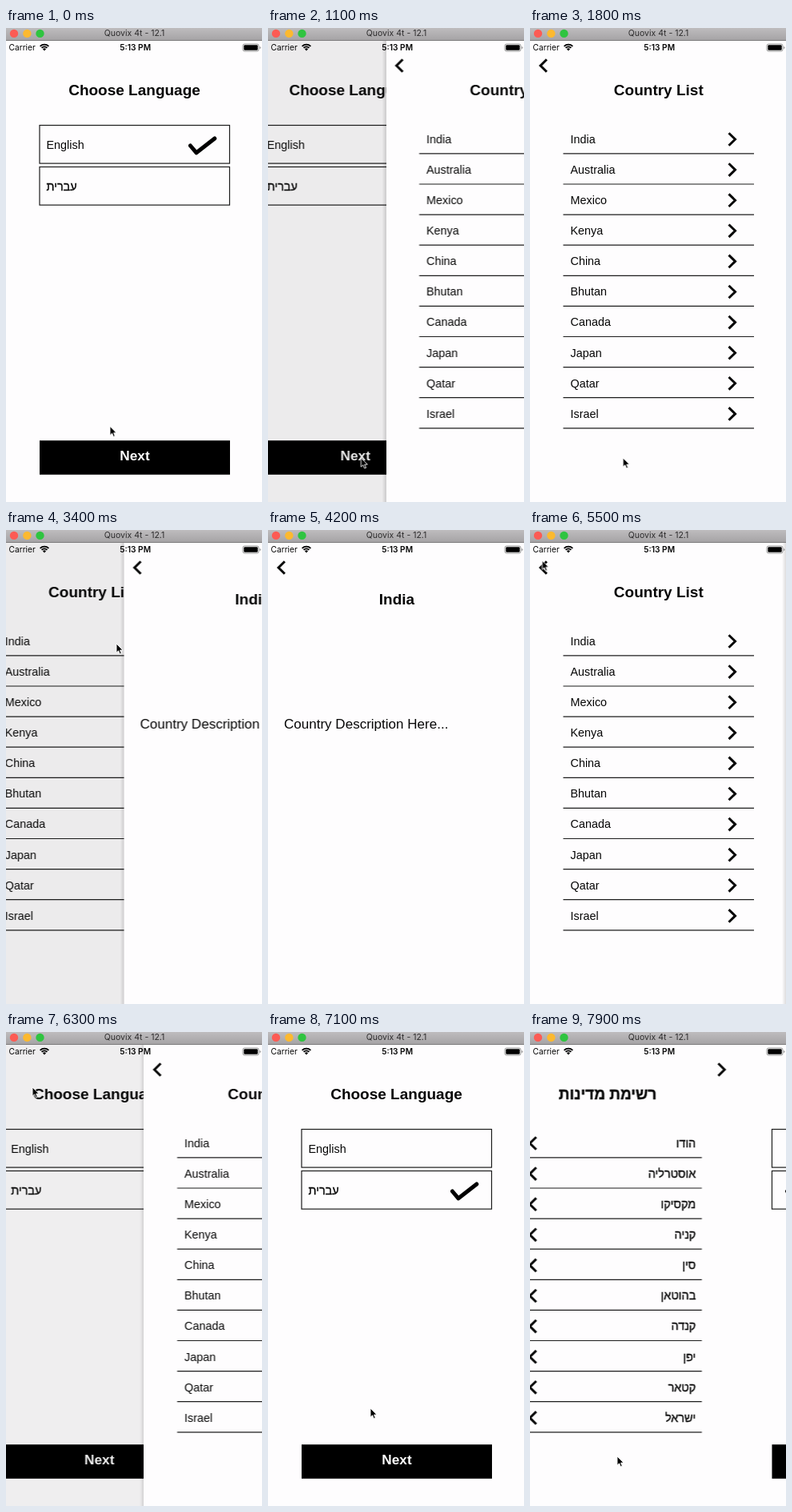
Animation, 320 px wide and 592 px high, one loop 8000 ms. Source, as an HTML page:

```html
<!DOCTYPE html>
<html lang="en">
<head>
<meta charset="utf-8">
<title>Language and country picker</title>
<style>
  html, body { margin: 0; width: 100%; height: 100%; overflow: hidden; background: #fefdfe; }
  svg { display: block; width: 320px; height: 592px; overflow: hidden; }
  text { font-family: "Liberation Sans", Arial, sans-serif; fill: #060606; }
  .title { font-size: 19px; font-weight: 700; text-anchor: middle; }
  .row { font-size: 14.4px; }
  .end { text-anchor: end; }
  .hebrew { stroke: #060606; stroke-width: .35; }
  .note { font-size: 17.05px; }
  .next { font-size: 17.2px; font-weight: 700; text-anchor: middle; fill: #fff; }
  .bar { font: 10.2px Inter, sans-serif; }
  .clock { font-weight: 600; text-anchor: middle; }
  .window { font: 10.5px Inter, sans-serif; text-anchor: middle; fill: #2c2b2c; }
  .line { fill: none; stroke: #1c1c1c; stroke-width: 1.2; }
  .chevron { fill: none; stroke: #080808; stroke-width: 3; }
  .check { fill: none; stroke: #000; stroke-width: 5; stroke-linecap: round; stroke-linejoin: round; }
</style>
</head>
<body>
<svg id="stage" viewBox="0 0 320 592"></svg>
<script>
const LOOP = 8000, TICK = 100, WIDTH = 320;
const countries = ['India', 'Australia', 'Mexico', 'Kenya', 'China', 'Bhutan', 'Canada', 'Japan', 'Qatar', 'Israel'];
const countriesHe = ['הודו', 'אוסטרליה', 'מקסיקו', 'קניה', 'סין', 'בהוטאן', 'קנדה', 'יפן', 'קטאר', 'ישראל'];

const text = (cls, x, y, s) => `<text class="${cls}${/[א-ת]/.test(s) ? ' hebrew' : ''}" x="${x}" y="${y}">${s}</text>`;
const chevron = (x, y, w, h) => `<path class="chevron" d="M${x - w} ${y - h}L${x + w} ${y}L${x - w} ${y + h}"/>`;
const mirrorX = (x, rtl) => rtl ? WIDTH - x : x;
const label = (y, s, rtl) => text(rtl ? 'row end' : 'row', rtl ? 271 : 50.5, y, s);
const back = rtl => chevron(mirrorX(17, rtl), 47, rtl ? 3.9 : -3.9, 7.8);

// The outer group slides in; the inner one drifts and darkens under the next page.
const page = (id, content) => `
  <g id="${id}">
    <rect x="-5" y="16" width="5" height="576" fill="url(#shade)"/>
    <g id="${id}Under">
      <rect y="16" width="320" height="576" fill="#fefdfe"/>${content}
      <rect id="${id}Dim" y="16" width="320" height="576" opacity="0"/>
    </g>
  </g>`;

const languages = rtl => {
  const left = rtl ? 40.5 : 42;
  return text('title', 160.5, 84, 'Choose Language') +
    [121.5, 173.5].map(y => `<rect class="line" x="${left}" y="${y}" width="237.5" height="47.6"/>`).join('') +
    label(150.7, 'English', rtl) + label(203, 'עברית', rtl) +
    `<g ${rtl ? 'transform="translate(-171 52)"' : 'id="check"'}>
       <path class="check" d="M230.5 147L238 155.8L260.8 138"/></g>
     <rect x="${left}" y="515.2" width="238" height="42.6"/>
     <g ${rtl ? '' : 'id="next"'}>${text('next', 161, 540.3, 'Next')}</g>`;
};

const list = (title, names, rtl) => back(rtl) + text('title', 160.8, 84, title) +
  names.map((name, i) => {
    const y = i * 38.1, x = rtl ? 40 : 41.5;
    return label(143.8 + y, name, rtl) +
      chevron(mirrorX(252.5, rtl), 139 + y, rtl ? -4 : 4, 7.8) +
      `<path class="line" d="M${x} ${156.9 + y}h238.5"/>`;
  }).join('');

const light = (x, color) => `<circle cx="${x}" cy="6.9" r="5.2" fill="${color}"/>`;
const wifiArc = r => {
  const d = r * Math.SQRT1_2;
  return `<path d="M${48 - d} ${28.3 - d}A${r} ${r} 0 0 1 ${48 + d} ${28.3 - d}" fill="none" stroke="#000" stroke-width="1.8"/>`;
};

const chrome = `
  ${text('bar', 3.5, 28, 'Carrier')}
  ${wifiArc(7.6)}${wifiArc(4.8)}
  <path d="M48 28.6L45.9 26.3A3 3 0 0 1 50.1 26.3Z"/>
  ${text('bar clock', 161.7, 28, '5:13 PM')}
  <rect x="296" y="20" width="20" height="9" rx="2.2" fill="none" stroke="#8c8c8c" stroke-width=".9"/>
  <rect x="297.3" y="21.2" width="17.4" height="6.6" rx="1.2"/>
  <path d="M317.2 23v3q1.3-.5 1.3-1.5t-1.3-1.5" fill="#8c8c8c"/>
  <rect width="320" height="16" fill="url(#metal)"/>
  <rect y="15" width="320" height="1" fill="#7d7c7d"/>
  ${light(10, '#fc5b54')}${light(26.4, '#fcb92f')}${light(42.5, '#2fc440')}
  ${text('window', 160.5, 10.4, 'Quovix 4t - 12.1')}`;

document.getElementById('stage').innerHTML = `
  <defs>
    <linearGradient id="shade"><stop stop-opacity="0"/><stop offset="1" stop-opacity=".13"/></linearGradient>
    <linearGradient id="metal" x2="0" y2="1"><stop stop-color="#bebcbe"/><stop offset="1" stop-color="#a4a2a4"/></linearGradient>
  </defs>
  <g id="ltr">
    ${page('lang', languages(false))}
    ${page('list', list('Country List', countries, false))}
    ${page('detail', back(false) + text('title', 161, 93, 'India') + text('note', 20, 248.2, 'Country Description Here...'))}
  </g>
  <g id="rtl">
    <rect y="16" width="320" height="576" fill="#fefdfe"/>
    <g id="langHe">${languages(true)}</g>
    <g id="listHe">${list('רשימת מדינות', countriesHe, true)}</g>
  </g>
  ${chrome}
  <path id="cursor" d="M0 0V11.2L2.6 8.8L4.4 13L6.3 12.2L4.6 8.1H8.1Z" stroke="#fff" stroke-width=".9"/>`;

const clamp = x => Math.min(1, Math.max(0, x));
const easeOut = (x, power) => 1 - (1 - clamp(x)) ** power;
const move = (x, y = 0) => ({ transform: `translate(${x}px, ${y}px)` });
const fade = opacity => ({ opacity });

// Samples a pose function of time once per tick and holds each sample.
function play(id, pose) {
  const ticks = LOOP / TICK;
  const frames = Array.from({ length: ticks + 1 }, (_, i) =>
    ({ offset: i / ticks, easing: 'step-end', ...pose(Math.min(i, ticks - 1) * TICK) }));
  document.getElementById(id).animate(frames, { duration: LOOP, iterations: Infinity });
}

const enter = (t, start) => easeOut((t - start) / 500, 4);

function slide(top, under, pushAt, popAt) {
  const shown = t => enter(t, pushAt) - enter(t, popAt);
  // A page at rest waits well outside, so that its shadow stays hidden.
  play(top, t => move(shown(t) ? WIDTH * (1 - shown(t)) : 2 * WIDTH));
  play(under + 'Under', t => move(-.3 * WIDTH * shown(t)));
  play(under + 'Dim', t => fade(.13 * shown(t)));
}

slide('list', 'lang', 1012, 6212);
slide('detail', 'list', 3312, 5012);

const flipped = t => t >= 7700;
const flipIn = t => enter(t, 7734);
play('ltr', t => fade(flipped(t) ? 0 : 1));
play('rtl', t => fade(flipped(t) ? 1 : 0));
play('listHe', t => move(-WIDTH * (1 - flipIn(t))));
play('langHe', t => move(327 * flipIn(t)));

const pressed = t => t >= 800 && t < 1100 || t >= 7500;
play('next', t => fade(pressed(t) ? .2 : 1));
play('check', t => move(0, t >= 6900 ? 52 : 0));

// Each stroke of the pointer bends from one resting point to the next.
const strokes = [
  { start: 0, end: 500, from: [130, 497.5], bend: [121, 532], to: [116.3, 537] },
  { start: 1800, end: 2400, from: [116.3, 537], bend: [88, 260], to: [138, 142] },
  { start: 3900, end: 4200, from: [138, 142], bend: [65, 83], to: [-9, 25] },
  { start: 4300, end: 4700, from: [-9, 25], bend: [3, 31], to: [15.3, 38.3] },
  { start: 6200, end: 6700, from: [15.3, 38.3], bend: [60, 115], to: [102, 192] },
  { start: 6900, end: 7500, from: [102, 192], bend: [156, 457], to: [109, 530], power: 3 }
];

play('cursor', t => {
  const { start, end, from, bend, to, power = 1 } = strokes.findLast(s => s.start <= t);
  const s = easeOut((t - start) / (end - start), power), r = 1 - s;
  return move(...from.map((a, i) => r * r * a + 2 * r * s * bend[i] + s * s * to[i]));
});
</script>
</body>
</html>
```
